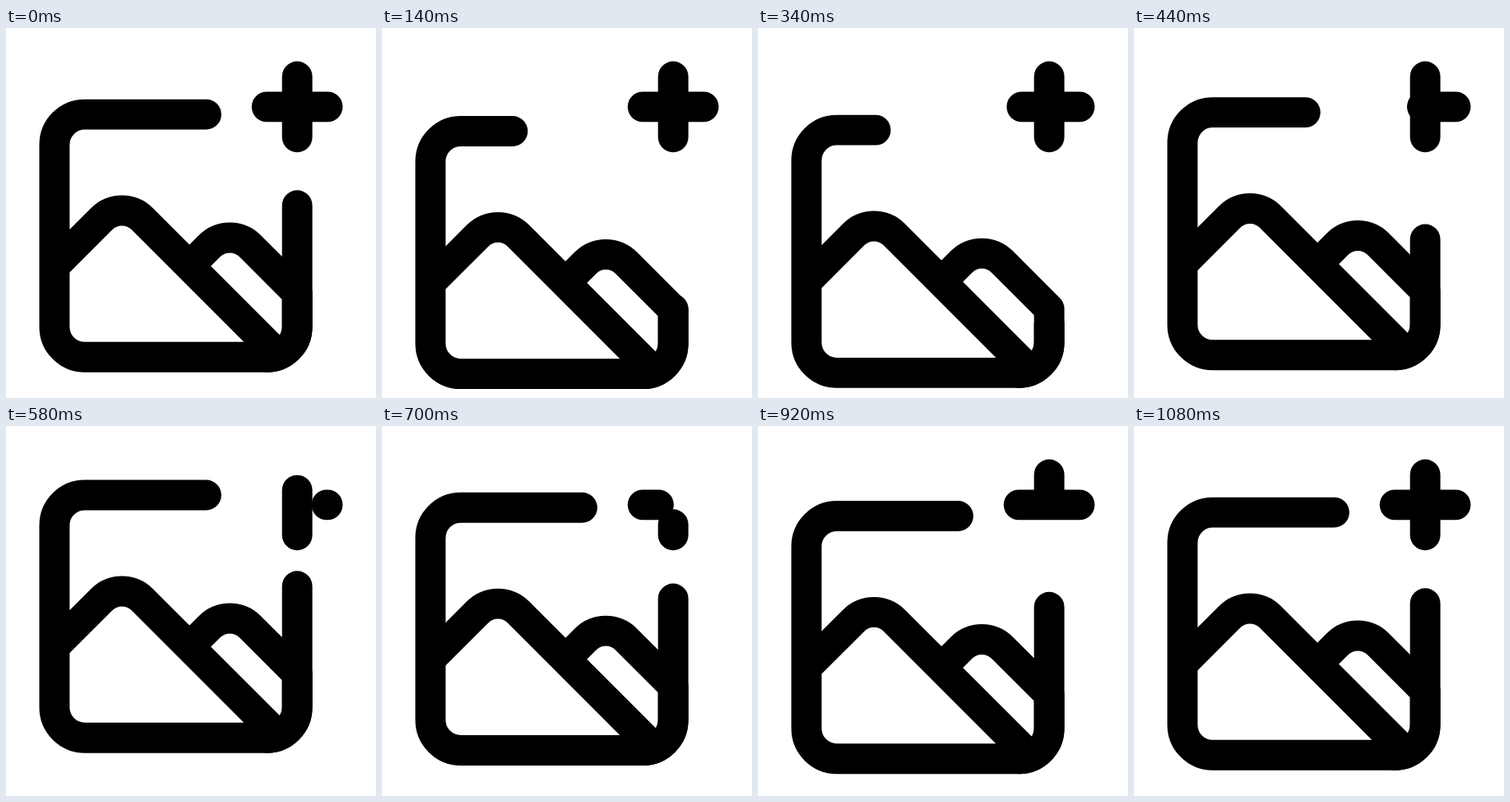
An HTML page with a canvas for the animation above (2720 ms loop, 450 px wide and 450 px high).

```html
<!DOCTYPE html>
<html lang="en">
<head>
<meta charset="utf-8">
<title>Add image icon</title>
<style>
  html, body { margin: 0; width: 100%; height: 100%; overflow: hidden; background: #fff; }
  canvas { display: block; width: 100%; height: 100%; }
</style>
</head>
<body>
<canvas id="stage" width="450" height="450"></canvas>
<script>
const ctx = document.getElementById('stage').getContext('2d');
const LOOP = 2720, STEP = 20;
const UNIT = 18.45, MARGIN = 225 - 12 * UNIT; // 24-unit grid, centred
const BORDER_LENGTH = 40 + 3 * Math.PI; // straight sides and three corners

const clamp = v => Math.min(1, Math.max(0, v));
const smooth = x => x * x * (3 - 2 * x);
const easeOut = x => 1 - Math.pow(1 - x, 2.2);
const sineOut = x => Math.sin(x * Math.PI / 2);
const ramp = (t, from, to) => smooth(clamp((t - from) / (to - from)));

// Vertical bounce in pixels: [start, end, from, to, easing]
const BOUNCE = [
  [0, 270, 0, 25.5, easeOut],
  [270, 570, 25.5, -21.2, smooth],
  [570, 830, -21.2, 9.5, smooth],
  [830, 1080, 9.5, 0, sineOut]
];

function bounce(t) {
  const part = BOUNCE.find(p => t < p[1]);
  if (!part) return 0;
  const [start, end, a, b, ease] = part;
  return a + (b - a) * ease((t - start) / (end - start));
}

// Both hills; the right one runs down into the lower right corner.
const hills = new Path2D(
  'M3.2 14.8L6.106 11.894a1.9 1.9 0 0 1 2.687 0l8.6 8.6' +
  'M11.9 15l1.317-1.317a1.9 1.9 0 0 1 2.686 0L19 16.78V19a2 2 0 0 1-2 2');
const border = new Path2D(
  'M13 5H5a2 2 0 0 0-2 2v12a2 2 0 0 0 2 2h12a2 2 0 0 0 2-2v-8');

// The border is trimmed at both ends, then grows back.
function drawBorder(t) {
  const cut = ramp(t, 0, 240) - ramp(t, 240, 540);
  const head = 7.35 * cut, tail = 9.2 * cut;
  if (cut > 0) {
    ctx.setLineDash([BORDER_LENGTH - head - tail, 200]);
    ctx.lineDashOffset = -head;
  }
  ctx.stroke(border);
  ctx.setLineDash([]);
}

// A bar drains towards its far end, then refills from its near end.
function drawBar(t, start, x, y, dx, dy) {
  const mid = start + 300;
  const a = t < mid ? ramp(t, start, mid) : 0;
  const b = t < mid ? 1 : ramp(t, mid, mid + 300);
  if (b - a < 0.001) return;
  ctx.beginPath();
  ctx.moveTo(x + dx * a, y + dy * a);
  ctx.lineTo(x + dx * b, y + dy * b);
  ctx.stroke();
}

function draw(t) {
  ctx.setTransform(1, 0, 0, 1, 0, 0);
  ctx.fillStyle = '#fff';
  ctx.fillRect(0, 0, 450, 450);
  ctx.strokeStyle = '#000';
  ctx.lineWidth = 2;
  ctx.lineCap = ctx.lineJoin = 'round';

  ctx.setTransform(UNIT, 0, 0, UNIT, MARGIN, MARGIN + UNIT / 2 + bounce(t));
  drawBorder(t);
  ctx.stroke(hills);

  ctx.setTransform(UNIT, 0, 0, UNIT, MARGIN, MARGIN);
  drawBar(t, 300, 17, 5, 4, 0);
  drawBar(t, 480, 19, 3, 0, 4);
}

const origin = performance.now();
function tick() {
  const t = (performance.now() - origin) % LOOP;
  draw(Math.floor(t / STEP) * STEP);
  requestAnimationFrame(tick);
}
tick();
</script>
</body>
</html>
```
